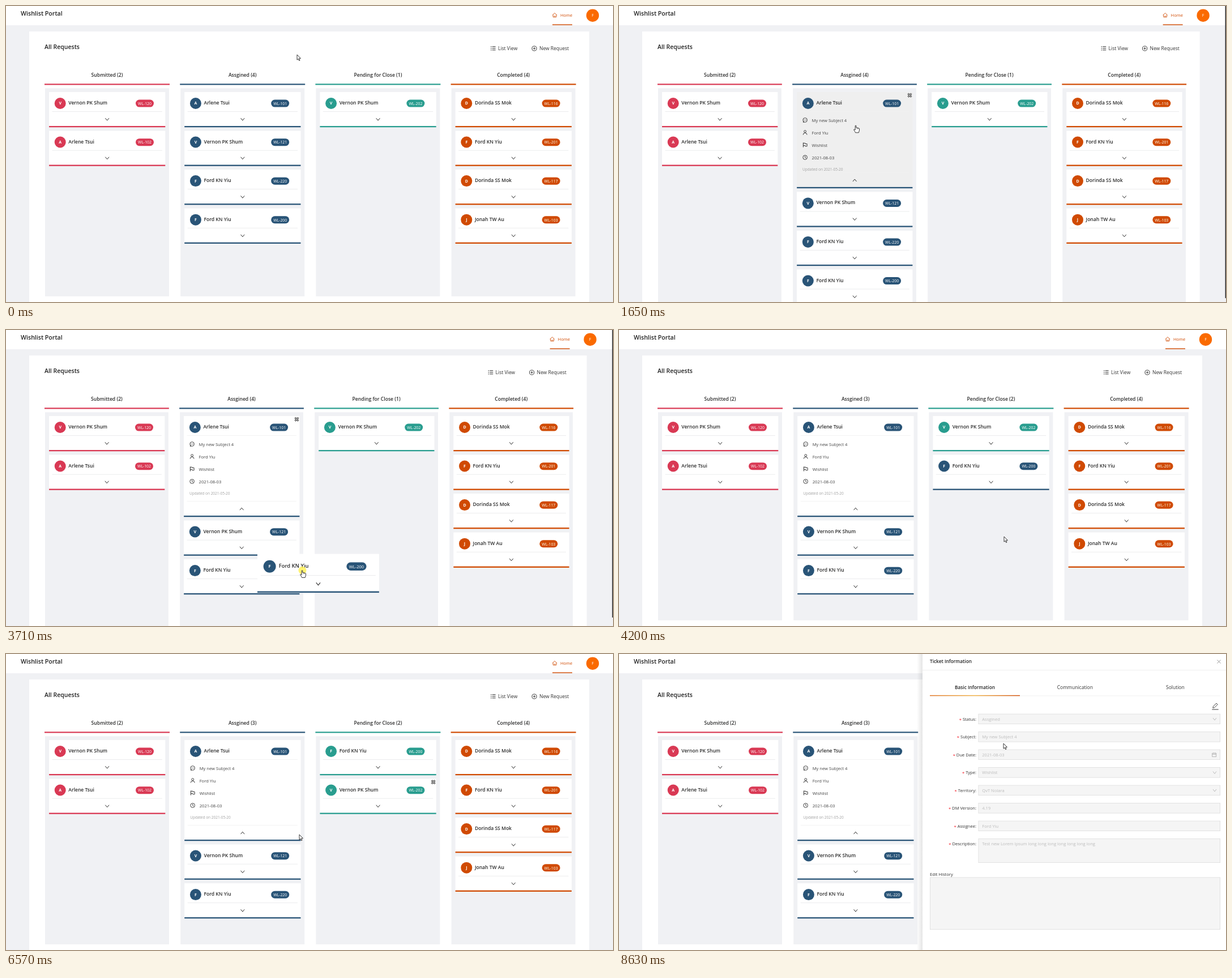
These frames come from a looping animation (1072x523 px, 8.7 s). An HTML page with a canvas:

```html
<!DOCTYPE html>
<html lang="en">
<head>
<meta charset="utf-8">
<title>Wishlist Portal</title>
<style>
html, body { margin: 0; width: 100%; height: 100%; overflow: hidden; background: #f0f1f4; }
canvas { display: block; width: 1072px; height: 523px; }
</style>
</head>
<body>
<canvas id="stage"></canvas>
<script>
const W = 1072, H = 523, LOOP = 8700, STEP = 70;
const canvas = document.getElementById('stage');
const g = canvas.getContext('2d');
const dpr = window.devicePixelRatio || 1;
canvas.width = W * dpr;
canvas.height = H * dpr;

const FONT = '"Open Sans", "Noto Sans", sans-serif';
const RED = '#d93954', BLUE = '#295477', TEAL = '#299d8f', ORANGE = '#d04a02';
const INK = '#2b2b2b', TOP = 152, PITCH = 68.55, EXTRA = 116;

const person = { v: 'Vernon PK Shum', a: 'Arlene Tsui', f: 'Ford KN Yiu', d: 'Dorinda SS Mok', j: 'Jonah TW Au' };
const card = (who, id) => ({ name: person[who], id: 'WL-' + id });
const submitted = [card('v', 120), card('a', 102)];
const assigned = [card('a', 101), card('v', 121), card('f', 220)];
const moved = card('f', 200), pending = card('v', 202);
const completed = [card('d', 116), card('f', 201), card('d', 117), card('j', 103)];

const spans = [[0, 0], [590, 1010], [1150, 1990], [2250, 3090], [3160, 3990], [4060, 4890],
  [4960, 5100], [5240, 6080], [6160, 6990], [7060, 7340], [7610, 8420], [8490, 8630]];

// Pointer path: time, x, y.
const path = [[520, 514, 86], [1010, 417, 204], [1150, 417, 204], [1640, 418, 211], [1990, 420, 214],
  [2180, 420, 214], [2600, 402, 298], [2880, 386, 354], [3090, 386, 428], [3370, 386, 500],
  [3440, 386, 500], [3990, 655, 352], [4060, 660, 355], [4200, 680, 365], [4480, 668, 300],
  [4890, 648, 197], [5100, 643, 188], [5310, 643, 188], [5660, 643, 271], [5800, 644, 275],
  [6100, 644, 274], [6580, 518, 319], [6990, 437, 313], [7340, 376, 231], [7680, 376, 231],
  [8420, 640, 180], [8630, 679, 158]];
const presses = [[1360, 1500], [3410, 4060], [5240, 5800], [7610, 7750]];

const clamp = u => Math.max(0, Math.min(1, u));
const mix = (a, b, u) => a + (b - a) * u;
const within = (t, a, b) => t >= a && t < b;
function ease(u) {
  u = clamp(u);
  return u < .5 ? 4 * u ** 3 : 1 - 4 * (1 - u) ** 3;
}

function snap(t) {
  let s = spans[0];
  for (const span of spans) if (t >= span[0]) s = span;
  return Math.min(s[1], s[0] + Math.floor((t - s[0] + 15) / STEP) * STEP);
}

function pointer(t) {
  if (t <= path[0][0]) return { x: path[0][1], y: path[0][2] };
  for (let i = 1; i < path.length; i++) {
    const a = path[i - 1], b = path[i];
    if (t <= b[0]) {
      const u = (t - a[0]) / (b[0] - a[0]);
      return { x: mix(a[1], b[1], u), y: mix(a[2], b[2], u) };
    }
  }
  const last = path[path.length - 1];
  return { x: last[1], y: last[2] };
}

function box(x, y, w, h, color) {
  g.fillStyle = color;
  g.fillRect(x, y, w, h);
}
function disc(x, y, r, color) {
  g.fillStyle = color;
  g.beginPath();
  g.arc(x, y, r, 0, 7);
  g.fill();
}
function ring(x, y, r, color = INK, width = .9) {
  g.strokeStyle = color;
  g.lineWidth = width;
  g.beginPath();
  g.arc(x, y, r, 0, 7);
  g.stroke();
}
function line(points, color = INK, width = 1) {
  g.strokeStyle = color;
  g.lineWidth = width;
  g.beginPath();
  for (let i = 0; i < points.length; i += 2) g.lineTo(points[i], points[i + 1]);
  g.stroke();
}
function text(s, x, cy, size, color = INK, weight = 400, align = 'left') {
  g.font = `${weight} ${size}px ${FONT}`;
  g.textAlign = align;
  g.fillStyle = color;
  g.fillText(s, x, cy + size * .357);
}
function at(x, y, draw, scale = 1) {
  g.save();
  g.translate(x, y);
  g.scale(scale, scale);
  draw();
  g.restore();
}

function chevron(x, y, dir = 1, color = INK, r = 3.3) {
  line([x - r, y - 2 * dir, x, y + 2 * dir, x + r, y - 2 * dir], color, 1);
}

function closeMark(x, y) {
  for (const [color, width] of [['#444', 3], ['#f4f4f4', 1]]) {
    line([x - 3, y - 3, x + 3, y + 3], color, width);
    line([x + 3, y - 3, x - 3, y + 3], color, width);
  }
}

function details() {
  const rows = ['My new Subject 4', 'Ford Yiu', 'Wishlist', '2021-08-03'];
  rows.forEach((s, i) => text(s, 26.5, 50.5 + 21.9 * i, 7.6, '#444'));
  text('Updated on 2021-05-20', 10, 137, 6.5, '#a0a0a0');
  ring(14.5, 49.5, 3.8);
  for (const dx of [-1.8, 0, 1.8]) disc(14.5 + dx, 49.5, .6, INK);
  line([11.5, 52, 11.2, 53.3, 13, 53.1], INK, .9);
  ring(14.5, 69.6, 1.9);
  g.beginPath();
  g.arc(14.5, 75.6, 3.4, Math.PI, 0);
  g.stroke();
  line([11.3, 89.5, 11.3, 97.5]);
  line([11.3, 90.3, 14.8, 90.3, 14.8, 91.5, 18, 91.5, 18, 95.8, 14.8, 95.8, 14.8, 94.6, 11.3, 94.6], INK, .9);
  ring(14.5, 115.5, 3.8);
  line([14.5, 113, 14.5, 115.7, 16.4, 116.7], INK, .9);
}

function drawCard(c, x, y, w, color, { hover = false, extra = 0, scale = 1 } = {}) {
  at(x, y, () => {
    box(0, 0, w, 62.3 + extra, hover ? '#efefef' : '#fff');
    box(0, 60 + extra, w, 2.3, color);
    disc(19.7, 20, 10, color);
    text(c.name[0], 19.7, 20, 7, '#fff', 700, 'center');
    text(c.name, 34.3, 19, 8.55, INK, 600);
    g.fillStyle = color;
    g.beginPath();
    g.roundRect(w - 52.3, 13.6, 32, 13, 6.5);
    g.fill();
    text(c.id, w - 36.3, 20.4, 6.9, '#fff', 400, 'center');
    const rule = extra > 0 ? '#f0f0f0' : '#e6e7e9';
    box(5.5, 34.2, w - 11, .8, rule);
    if (extra > 0) {
      g.save();
      g.beginPath();
      g.rect(0, 35, w, extra);
      g.clip();
      details();
      g.restore();
      box(5.5, 34.2 + extra, w - 11, .8, rule);
    }
    chevron(w / 2, 48.2 + extra, extra > EXTRA / 2 ? -1 : 1);
  }, scale);
}

function navigation(dx) {
  box(0, 0, W, 34, '#fff');
  text('Wishlist Portal', 26, 13.5, 10.6, '#222', 600);
  at(dx, 0, () => {
    line([965, 16.3, 969, 12.3, 973, 16.3], ORANGE, .9);
    line([966.2, 15.5, 966.2, 19.5, 971.8, 19.5, 971.8, 15.5], ORANGE, .9);
    line([969, 19.5, 969, 17], ORANGE, .9);
    text('Home', 979, 16, 7.5, ORANGE);
    box(965, 32.4, 35, 1.4, ORANGE);
    disc(1036, 16.7, 11.2, '#fa6a00');
    text('F', 1036, 16.7, 7, '#fff', 400, 'center');
  });
}

function toolbar(dx) {
  text('All Requests', 68, 72, 10.5, '#222', 600);
  at(dx, 0, () => {
    for (const y of [71.7, 74.7, 77.7]) {
      box(856, y - .5, 1.4, 1.1, INK);
      box(858.6, y - .5, 6, 1, INK);
    }
    text('List View', 869, 75, 8.5, '#333');
    ring(933, 75, 4.1);
    line([930.8, 75, 935.2, 75], INK, .9);
    line([933, 72.8, 933, 77.2], INK, .9);
    text('New Request', 942, 75, 8.5, '#333');
  });
}

function board(t, p) {
  const extra = EXTRA * ease((t - 1455) / 250);
  const narrow = extra > 75 && t < 4060;
  const dx = narrow ? -4.4 : 0;
  const pitch = narrow ? 238.1 : 239.2;
  const cardW = narrow ? 204.3 : 205.3;
  const dropped = t >= 4060;
  const dragA = within(t, 3440, 4060), dragB = within(t, 5310, 5800);
  const dragging = dragA || dragB;

  box(0, 0, W, H, '#f0f1f4');
  navigation(dx);
  box(41, 45, 989 + dx, H - 45, '#fff');
  toolbar(dx);

  const titles = ['Submitted (2)', `Assgined (${dropped ? 3 : 4})`, `Pending for Close (${dropped ? 2 : 1})`, 'Completed (4)'];
  [RED, BLUE, TEAL, ORANGE].forEach((color, i) => {
    const x = 68 + pitch * i, w = narrow ? 219.8 : 221;
    text(titles[i], x + w / 2, 122, 8.6, INK, 600, 'center');
    box(x, 137.3, w, 2.2, color);
    box(x + 1, 145.3, w - 2, (narrow ? H : 513) - 145.3, '#f0f1f4');
  });

  let hand = dragging;
  const place = (c, col, y, color, open = 0) => {
    const x = 76 + pitch * col;
    const hover = !dragging && t < 7900 && p.x > x + 4 && p.x < x + cardW - 4 && p.y > y && p.y < y + 62.3 + open;
    hand = hand || hover;
    drawCard(c, x, y, cardW, color, { hover, extra: open });
  };
  const slot = i => TOP + PITCH * i;

  submitted.forEach((c, i) => place(c, 0, slot(i), RED));
  assigned.forEach((c, i) => place(c, 1, slot(i) + (i ? extra : 0), BLUE, i ? 0 : extra));
  completed.forEach((c, i) => place(c, 3, slot(i), ORANGE));
  if (!dropped && !dragA) place(moved, 1, slot(3) + extra, BLUE);
  if (dropped) {
    const up = ease((t - 5460) / 275);
    place(moved, 2, slot(1 - up), t < 4480 ? BLUE : TEAL);
  }
  if (!dragB) place(pending, 2, slot(t < 5800 ? 0 : 1), TEAL);

  const mark = (col, y) => closeMark(76 + pitch * col + cardW - 5, y + 5.7);
  if (within(t, 860, 4060) || within(t, 6850, 7900)) mark(1, TOP);
  if (within(t, 4820, 5310)) mark(2, TOP);
  if (within(t, 5800, 6850)) mark(2, slot(1));

  const lifted = { scale: 1.1 };
  if (dragA) drawCard(moved, p.x - 79, p.y - 29, 195.4, BLUE, lifted);
  if (dragB) drawCard(pending, p.x - 88, p.y - 36, 195.4, TEAL, lifted);
  if (narrow) box(1070.6, 0, 1.4, H - Math.max(0, extra - 101), '#222');
  return hand;
}

function field(label, value, cy, y, h, icon) {
  text(label + ':', 631, cy, 7.6, '#333', 400, 'right');
  const w = g.measureText(label + ':').width;
  text('*', 631 - w - 2, cy + .8, 7.6, '#f5222d', 400, 'right');
  box(634.5, y, 427.5, h, '#d9d9d9');
  box(635.2, y + .7, 426.1, h - 1.4, '#f5f5f5');
  text(value, 641.3, cy, 7.55, '#bcbcbc');
  if (icon === 'list') chevron(1052, cy, 1, '#bcbcbc', 3);
  if (icon === 'date') {
    g.strokeStyle = '#aaa';
    g.lineWidth = .8;
    g.strokeRect(1047.7, cy - 2.6, 7, 6);
    line([1047.7, cy - .4, 1054.7, cy - .4], '#aaa', .8);
    line([1049.7, cy - 4, 1049.7, cy - 1.8], '#aaa', .8);
    line([1052.7, cy - 4, 1052.7, cy - 1.8], '#aaa', .8);
  }
}

function drawer(t) {
  const open = ease((t - 7680) / 320);
  if (!open) return;
  at(536 * (1 - open), 0, () => {
    const shade = g.createLinearGradient(526, 0, 536, 0);
    shade.addColorStop(0, 'rgba(0,0,0,0)');
    shade.addColorStop(1, 'rgba(0,0,0,.1)');
    box(526, 0, 10, H, shade);
    box(536, 0, 536, H, '#fff');
    text('Ticket Information', 549, 13.5, 8.3, '#222', 600);
    line([1056.5, 10.5, 1062.5, 16.5], '#888', .9);
    line([1062.5, 10.5, 1056.5, 16.5], '#888', .9);
    box(536, 28, 536, .8, '#ececec');
    text('Basic Information', 628.5, 59, 8.3, '#222', 600, 'center');
    text('Communication', 805.3, 59, 8.5, '#333', 400, 'center');
    text('Solution', 982.3, 59, 8.5, '#333', 400, 'center');
    box(549, 73.6, 513, .7, '#ececec');
    const ink = g.createLinearGradient(549, 0, 708, 0);
    ink.addColorStop(0, '#e0701c');
    ink.addColorStop(.5, '#f0b040');
    ink.addColorStop(1, '#d04a02');
    box(549, 72.8, 159, 1.4, ink);

    line([1047.3, 98, 1058.7, 98], '#444', 1.1);
    line([1048.8, 95.3, 1049.4, 92.6, 1055, 87, 1057.2, 89.2, 1051.6, 94.8, 1048.8, 95.3], '#444', 1);

    const rows = [['Status', 'Assgined', 'list'], ['Subject', 'My new Subject 4'], ['Due Date', '2021-08-03', 'date'],
      ['Type', 'Wishlist', 'list'], ['Territory', 'QvT Nolara', 'list'], ['DM Version', '4.19'], ['Assignee', 'Ford Yiu']];
    rows.forEach(([label, value, icon], i) => {
      const cy = 115 + 31.5 * i;
      field(label, value, cy, cy - 9.3, 18.3, icon);
    });
    field('Description', 'Test new Lorem Ipsum' + ' long'.repeat(7), 335.5, 326, 43);
    text('Edit History', 549, 389, 7.6, '#333');
    box(549, 394.5, 513, 92.5, '#d9d9d9');
    box(549.7, 395.2, 511.6, 91.1, '#f5f5f5');
  });
}

function outline(points) {
  g.beginPath();
  for (let i = 0; i < points.length; i += 2) g.lineTo(points[i], points[i + 1]);
  g.closePath();
  g.fillStyle = '#fff';
  g.fill();
  g.strokeStyle = '#222';
  g.lineWidth = .9;
  g.stroke();
}

function cursor(t, p, hand) {
  if (presses.some(([a, b]) => within(t, a, b))) disc(p.x + .5, p.y, 7, 'rgba(255,238,60,.72)');
  at(p.x, p.y, () => {
    if (!hand) {
      outline([0, 0, 0, 9.2, 2.1, 7.4, 3.6, 10.6, 5, 10, 3.6, 6.8, 6.4, 6.6]);
      return;
    }
    outline([-.8, .6, 0, 0, .9, .6, .9, 4, 2.6, 4, 4.3, 4.6, 6, 5.1, 6.6, 6, 6.4, 9.2, 5.2, 12.8,
      -.4, 12.8, -1.6, 10.4, -3.4, 7.6, -2.8, 6.8, -.8, 8]);
    for (const x of [2.4, 4.2]) line([x, 4.4, x, 6.6], '#222', .6);
  });
}

function frame(now) {
  const t = snap(now % LOOP);
  const p = pointer(t);
  g.setTransform(dpr, 0, 0, dpr, 0, 0);
  const hand = board(t, p);
  drawer(t);
  cursor(t, p, hand);
  requestAnimationFrame(frame);
}
requestAnimationFrame(frame);
</script>
</body>
</html>
```
